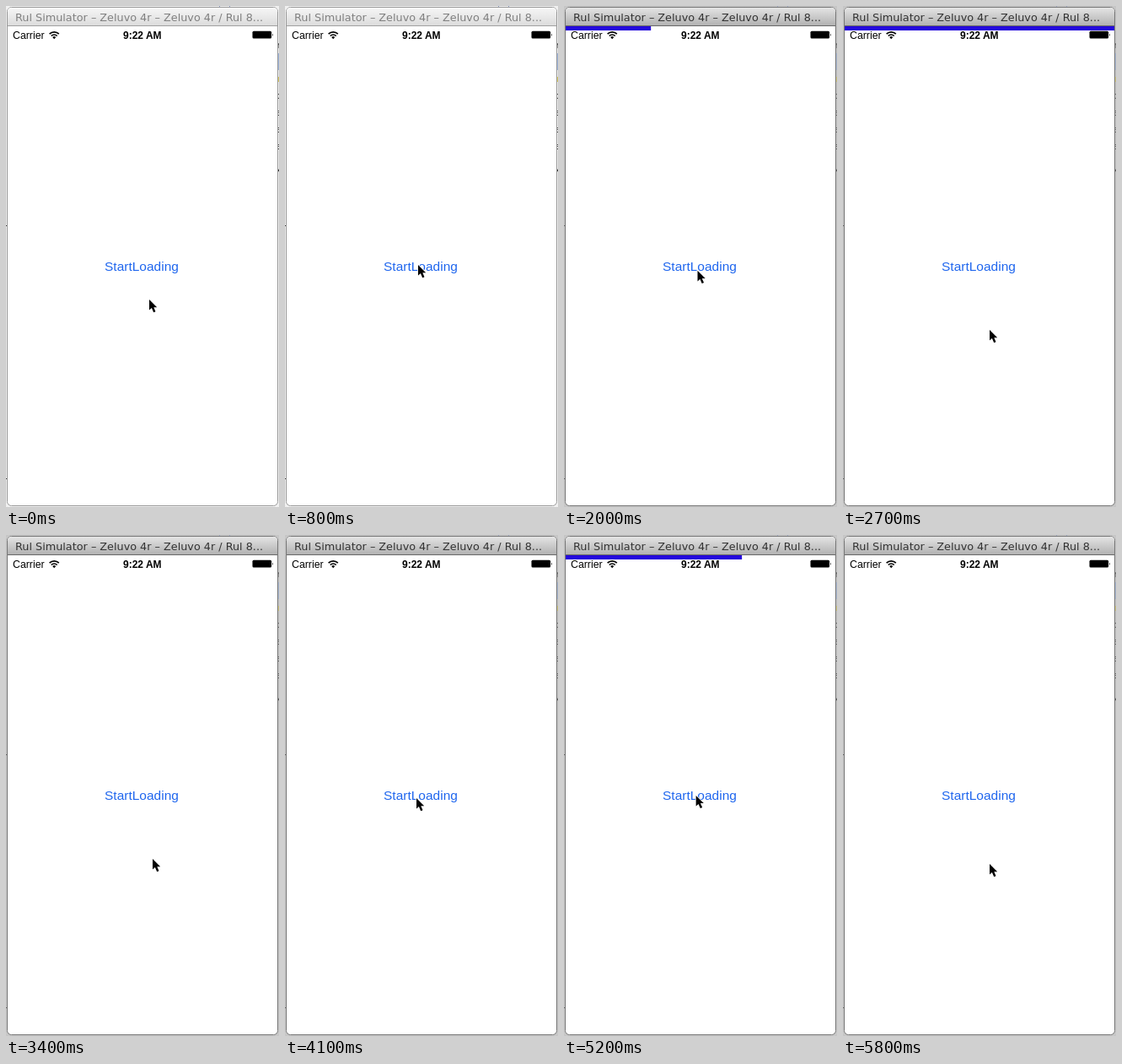
An HTML page for the animation above (5900 ms loop, 324 by 594 pixels).

```html
<!DOCTYPE html>
<html lang="en">
<head>
<meta charset="utf-8">
<title>Loading bar</title>
<style>
  html, body { margin: 0; width: 100%; height: 100%; overflow: hidden; background: #fff; }
  svg { display: block; width: 324px; height: 594px; }
  text { font-family: "Liberation Sans", Arial, sans-serif; white-space: pre; }
  #title { font: 12.8px "DejaVu Sans", sans-serif; }
  #behind text { font: 11px "DejaVu Sans Mono", monospace; fill: #222; }
</style>
</head>
<body>
<svg viewBox="0 0 324 594" xmlns="http://www.w3.org/2000/svg">
  <defs>
    <linearGradient id="idle" x2="0" y2="1">
      <stop offset="0" stop-color="#f6f6f6"/><stop offset="1" stop-color="#dcdcdc"/>
    </linearGradient>
    <linearGradient id="active" x2="0" y2="1">
      <stop offset="0" stop-color="#e4e4e4"/><stop offset="1" stop-color="#b2b2b2"/>
    </linearGradient>
  </defs>

  <rect id="desk" width="324" height="594"/>
  <g id="behind">
    <text x="320.5" y="50">r</text>
    <text x="320.5" y="110">c</text>
    <text x="320.5" y="130">e</text>
    <text x="320.5" y="150">e</text>
    <text x="320.5" y="170">e</text>
    <text x="320.5" y="198">x</text>
    <path d="M323 56v20" stroke="#9db4dc" stroke-width="2"/>
    <path d="M323 84v6" stroke="#d8c860" stroke-width="2"/>
    <path d="M0 260.5h2M0 560.5h2" stroke="#333"/>
    <path d="M253.5 0v2M265.5 0v2" stroke="#8c9cc8"/>
  </g>

  <rect id="frame" x="1.5" y="1.5" width="321" height="591" rx="5" fill="#fff"/>
  <path id="bar" d="M2 23V6q0-4 4-4H318q4 0 4 4V23Z"/>
  <path id="rule" d="M2 23.5H322"/>
  <text id="title" x="11" y="18">Rul Simulator – Zeluvo 4r – Zeluvo 4r / Rul 8...</text>

  <text x="8" y="38.5" font-size="12.3">Carrier</text>
  <text x="139" y="38.5" font-size="12" font-weight="bold">9:22 AM</text>
  <g fill="none" stroke="#000" stroke-width="1.7">
    <path d="M51.6 33.2a8 8 0 0 1 11.2 0M53.7 35.5a5 5 0 0 1 7 0"/>
    <path d="M57.2 39.2l-2-2.2a3 3 0 0 1 4 0Z" fill="#000" stroke="none"/>
  </g>
  <rect x="292.5" y="29.8" width="22.6" height="8.8" rx="1.5" fill="#000"/>
  <path d="M316 32.4q1.6 1.8 0 3.6Z"/>

  <text id="button" x="117" y="314" font-size="15.5" fill="#1f66ee">StartLoading</text>
  <rect id="progress" x="2" y="24" height="5" fill="#2408dc"/>
  <path id="cursor" d="M0 0V12.6L2.9 10L5.2 15.2L7.5 14.2L5.3 9.2H9.2Z"
        stroke="#fff" stroke-width="1.6" paint-order="stroke"/>
</svg>
<script>
const LOOP = 5900, ACTIVE_AT = 1200, RAMP = 1300;
const $ = id => document.getElementById(id);
const set = (id, attrs) => {
  for (const k in attrs) $(id).setAttribute(k, attrs[k]);
};
const clamp = x => Math.min(1, Math.max(0, x));
const ease = x => x * x * (3 - 2 * x);

// Pointer stops: time, x, y
const stops = [
  [0, 170, 348], [100, 170, 348], [700, 158, 307], [1200, 158, 307], [1400, 157, 307],
  [1900, 157, 307], [2450, 174, 384], [3400, 174, 384], [3950, 156, 312],
  [4150, 156, 312], [4500, 156, 306], [5150, 156, 306], [5600, 174, 388],
  [5700, 174, 388], [5800, 174, 390], [LOOP, 174, 390]
];

// Each run: press, start of the bar, start and end of its fade
const runs = [
  { press: 1230, start: 1270, out: 2720, gone: 2900 },
  { press: 4130, start: 4150, out: 5480, gone: 5600 }
];

function pointer(t) {
  const i = stops.findIndex(s => s[0] > t);
  const [t0, x0, y0] = stops[i - 1], [t1, x1, y1] = stops[i];
  const k = ease((t - t0) / (t1 - t0));
  return [x0 + (x1 - x0) * k, y0 + (y1 - y0) * k];
}

function draw(t) {
  const on = t >= ACTIVE_AT;
  set('desk', { fill: on ? '#c6c6c6' : '#f0f0f0' });
  set('behind', { opacity: on ? 0.7 : 1 });
  set('frame', { stroke: on ? '#777' : '#999' });
  set('bar', { fill: `url(#${on ? 'active' : 'idle'})` });
  set('rule', { stroke: on ? '#686868' : '#a0a0a0' });
  set('title', { fill: on ? '#333' : '#808080' });

  let width = 0, alpha = 1, text = 1;
  for (const r of runs) {
    if (t >= r.press && t < r.press + 500) {
      text = 0.3 + 0.7 * ease(clamp((t - r.press - 180) / 320));
    }
    if (t >= r.start && t < r.gone) {
      width = 320 * clamp((t - r.start) / RAMP) ** 2;
      alpha = 1 - clamp((t - r.out) / (r.gone - r.out));
    }
  }
  set('button', { opacity: text });
  set('progress', { width, opacity: alpha });
  set('cursor', { transform: `translate(${pointer(t)})` });
}

const begin = performance.now();
function tick() {
  draw((performance.now() - begin) % LOOP);
  requestAnimationFrame(tick);
}
tick();
</script>
</body>
</html>
```
